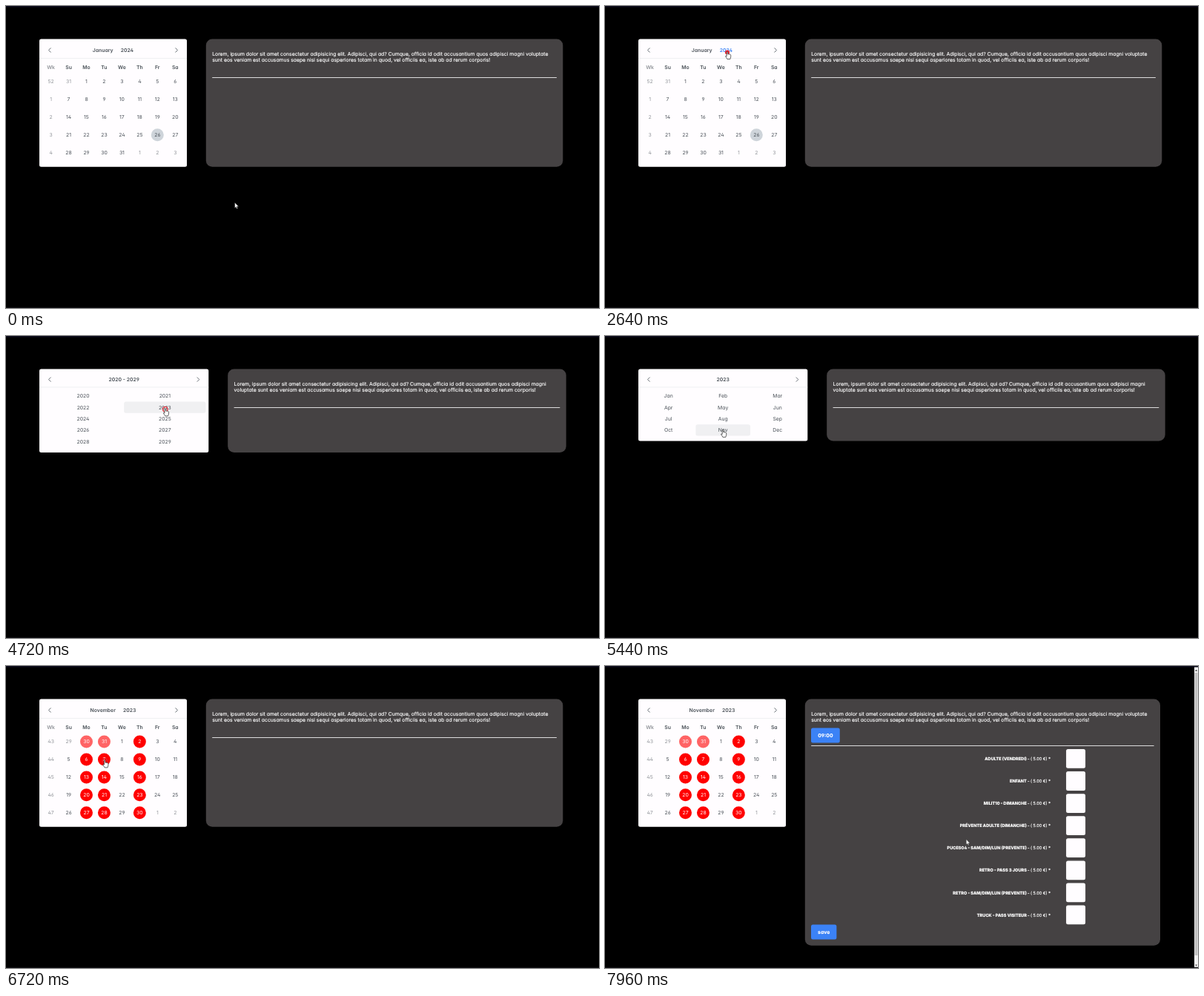
Recreate the animation shown at these times as an HTML page. Size 800 by 407 pixels, loop 8000 ms.

```html
<!DOCTYPE html>
<html lang="en">
<head>
<meta charset="utf-8">
<title>Booking calendar</title>
<style>
html, body { margin: 0; width: 100%; height: 100%; overflow: hidden; background: #000; }
svg { display: block; width: 100%; height: 100%; }
text {
  font: 400 6.84px Inter, "Open Sans", sans-serif;
  font-feature-settings: "cv02", "cv03", "cv04", "cv11";
  text-rendering: geometricPrecision;
  fill: #495057;
  white-space: pre;
}
.mid { text-anchor: middle; }
.end { text-anchor: end; }
.bold { font-weight: 600; }
.dim { opacity: .6; }
.white { fill: #fff; stroke: #fff; stroke-width: .16; }
.label { font-size: 5.6px; }
.label tspan { font-weight: 800; }
.btn { font-weight: 700; }
.card { fill: #fffdff; }
.panel { fill: #454243; }
.blue { fill: #3b82f6; }
.rule { stroke: #e3e6ea; stroke-width: .6; }
.hr { stroke: #dcdcdc; stroke-width: 1; }
.chev { fill: none; stroke: #5c636a; stroke-width: .9; }
.spot { fill: none; }
.today .spot { fill: #ced4da; }
.red .spot { fill: #f00; }
.red text { fill: #fff; }
.hover:not(.red):not(.today) .spot { fill: #f0f0f2; }
.title.hover text { fill: #3b82f6; }
.off { display: none; }
</style>
</head>
<body>
<svg id="stage" viewBox="0 0 800 407" preserveAspectRatio="none"></svg>
<script>
const NS = "http://www.w3.org/2000/svg";
const stage = document.getElementById("stage");

function add(parent, tag, attrs = {}, content) {
  const el = document.createElementNS(NS, tag);
  for (const k in attrs) el.setAttribute(k, attrs[k]);
  if (content !== undefined) el.textContent = content;
  return parent.appendChild(el);
}
const group = (parent, cls = "") => add(parent, "g", { class: cls });
const box = (parent, cls, x, y, width, height, rx = 2.5) =>
  add(parent, "rect", { class: cls, x, y, width, height, rx });
const line = (parent, cls, x1, x2, y) => add(parent, "line", { class: cls, x1, x2, y1: y, y2: y });
// y is the middle of the capitals
const label = (parent, cls, x, y, str, size = 6.84) =>
  add(parent, "text", { class: cls, x, y: y + size * .364 }, str);

// ---- left card ----
const LEFT = 45, TOP = 44.5, DAY = 864e5;

function card(width, height, headY, ruleY) {
  const g = group(stage);
  g.hot = [];
  box(g, "card", LEFT, TOP, width, height);
  line(g, "rule", LEFT, LEFT + width, ruleY);
  for (const [x, d] of [[LEFT + 14, -1], [LEFT + width - 14, 1]])
    add(g, "path", { class: "chev", d: `M${x - d * 1.5} ${headY - 3}l${d * 3} 3l${-d * 3} 3` });
  return g;
}

function hotItem(g, cls, x, y, w, h, str, round) {
  const item = group(g, cls), title = cls.includes("title");
  if (!title) box(item, "spot", x - w / 2, y - h / 2, w, h, round);
  label(item, title ? "mid bold" : "mid", x, y, str);
  g.hot.push({ el: item, x, y, w: w / 2, h: h / 2 });
}

function calendar(month, year, yearX, start, firstWeek, style) {
  const g = card(199, 172.2, 59.5, 70.6);
  const colX = c => 60.6 + 23.95 * c, rowY = r => 102 + 23.95 * r;
  hotItem(g, "title", 130.7, 59.5, 31, 13, month);
  hotItem(g, "title", yearX, 59.5, 21, 13, year);
  "Wk Su Mo Tu We Th Fr Sa".split(" ").forEach((d, c) =>
    label(g, c ? "mid bold" : "mid bold dim", colX(c), 82.3, d));
  const current = new Date(start + 7 * DAY).getUTCMonth();
  for (let r = 0; r < 5; r++) {
    label(g, "mid dim", colX(0), rowY(r), (firstWeek + r - 1) % 52 + 1);
    for (let c = 1; c < 8; c++) {
      const day = new Date(start + (r * 7 + c - 1) * DAY), date = day.getUTCDate();
      const inside = day.getUTCMonth() === current;
      hotItem(g, style(c, date, inside) + (inside ? "" : " dim"), colX(c), rowY(r), 17, 17, date, 8.5);
    }
  }
  return g;
}

function picker(title, height, cols, items) {
  const g = card(228.3, height, 58.6, 69);
  const w = 220.6 / cols, h = 15.4;
  hotItem(g, "title", 159.2, 58.6, title.length * 4.6, 13, title);
  items.forEach((str, i) =>
    hotItem(g, "", 48.9 + w * (i % cols + .5), 80.7 + h * Math.floor(i / cols), w, h, str, 2.5));
  return g;
}

// ---- right panel ----
const lead = "Lorem, ipsum dolor sit amet consectetur adipisicing elit. Adipisci, qui ad? Cumque, officia id odit accusantium quos adipisci magni";
const tail = "sunt eos veniam est accusamus saepe nisi sequi asperiores totam in quod, vel officiis ea, iste ab ad rerum corporis!";

function panel(x, width, height, hrY, wrapEarly) {
  const g = group(stage), word = " voluptate ", pad = 8.4;
  box(g, "panel", x, TOP, width, height, 8.5);
  label(g, "white", x + pad, 64.4, wrapEarly ? lead : lead + word);
  label(g, "white", x + pad, 73, wrapEarly ? word.trimStart() + tail : tail);
  line(g, "hr", x + pad, x + width - pad, hrY);
  return g;
}

function button(g, y, width, str) {
  const x = 278, h = 20;
  box(g, "blue", x, y, width, h);
  label(g, "mid btn white", x + width / 2, y + h / 2, str);
}

function form() {
  const g = panel(269.8, 479.2, 332.3, 107.5, false);
  button(g, 83.6, 38.8, "09:00");
  ["ADULTE (VENDREDI)", "ENFANT", "MILIT10 - DIMANCHE", "PRÉVENTE ADULTE (DIMANCHE)",
   "PUCES04 - SAM/DIM/LUN (PREVENTE)", "RETRO - PASS 3 JOURS",
   "RETRO - SAM/DIM/LUN (PREVENTE)", "TRUCK - PASS VISITEUR"].forEach((name, i) => {
    const y = 125 + 30.08 * i;
    const t = label(g, "end label white", 601, y, "", 5.6);
    add(t, "tspan", {}, name + " - ");
    t.append("( 5.00 €) *");
    box(g, "card", 622.1, y - 13, 26, 25.8);
  });
  button(g, 348.5, 34.4, "save");
  // page scrollbar
  add(g, "rect", { x: 795, width: 5, height: 407, fill: "#f1f1f1" });
  add(g, "rect", { x: 795.6, y: 9, width: 3.9, height: 381, fill: "#c1c1c1" });
  add(g, "path", { d: "M796 7l1.6 -2.2l1.6 2.2zM796 402.4l1.6 2.2l1.6 -2.2z", fill: "#505050" });
  return g;
}

const views = {
  january: calendar("January", "2024", 163.4, Date.UTC(2023, 11, 31), 52,
    (c, d, inside) => inside && d === 26 ? "today" : ""),
  years: picker("2020 - 2029", 112.5, 2, Array.from({ length: 10 }, (_, i) => 2020 + i)),
  months: picker("2023", 97.1, 3, "Jan Feb Mar Apr May Jun Jul Aug Sep Oct Nov Dec".split(" ")),
  november: calendar("November", "2023", 166.6, Date.UTC(2023, 9, 29), 43,
    c => [2, 3, 5].includes(c) ? "red" : "")
};
const panels = {
  tall: panel(269.8, 481.5, 172.2, 96.5, false),
  short: panel(299.2, 456.5, 112.5, 96.5, true),
  low: panel(299.2, 456.5, 97.1, 96.5, true),
  form: form()
};
const scenes = [
  [0, "january", "tall"], [2720, "years", "short"], [4800, "months", "low"],
  [5600, "november", "tall"], [6760, "november", "form"]
];

add(stage, "rect", { width: 800, height: 1.6, fill: "#0c0c1c" });
add(stage, "rect", { y: 405.8, width: 800, height: 1.2, fill: "#101014" });

// ---- pointer ----
const ring = add(stage, "circle", { fill: "#f00", stroke: "#e8202c", "stroke-width": 1.2 });
const pointer = group(stage);
const arrow = add(pointer, "path", {
  d: "M0 0V7.2L1.6 5.7L2.7 8.2L3.8 7.7L2.7 5.3H5z", fill: "#fff", stroke: "#222", "stroke-width": .4
});
const hand = add(pointer, "path", {
  d: "M-.8 .7Q0 -.5 .8 .7V3.6Q4.7 3 4.7 5V7.4L3.8 10.3H-.1Q-.8 8.8 -2.4 6.7Q-2.6 5.4 -.8 6.4z",
  fill: "#fff", stroke: "#222", "stroke-width": .7, "stroke-linejoin": "round"
});

// eased moves: start, end, x, y
const moves = [
  [0, 0, 308.7, 265], [280, 280, 252.5, 236.5], [640, 1560, 163.8, 64.2], [2040, 2160, 165, 61.3],
  [2760, 3400, 115.8, 126.4], [3480, 3680, 100, 138], [3680, 4240, 217, 111], [4240, 4560, 214.8, 97.5],
  [4840, 5440, 159, 126], [5640, 5880, 151.8, 145.6], [5920, 6080, 167, 143], [6080, 6280, 133.2, 126.6],
  [6840, 7360, 300.5, 197.5], [7680, 7960, 487.3, 233.6]
];
const clicks = [2600, 4640, 5480, 6640];

function pointerAt(t) {
  let x = 0, y = 0;
  for (const [from, to, toX, toY] of moves) {
    if (t < from) break;
    const s = to > from ? Math.min(1, (t - from) / (to - from)) : 1;
    const ease = s * s * (3 - 2 * s);
    x += (toX - x) * ease;
    y += (toY - y) * ease;
  }
  return [x, y];
}

function draw(now) {
  const t = Math.floor(now % 8000 / 40) * 40;
  const [, view, side] = scenes.filter(s => s[0] <= t).pop();
  for (const k in views) views[k].classList.toggle("off", k !== view);
  for (const k in panels) panels[k].classList.toggle("off", k !== side);

  const [x, y] = pointerAt(t);
  let over = false;
  for (const h of views[view].hot) {
    const hit = Math.abs(x - h.x) < h.w && Math.abs(y - h.y) < h.h;
    h.el.classList.toggle("hover", hit);
    over = over || hit;
  }
  pointer.setAttribute("transform", `translate(${x} ${y})`);
  arrow.classList.toggle("off", over);
  hand.classList.toggle("off", !over);

  const age = t - Math.max(-1e4, ...clicks.filter(c => c <= t));
  ring.classList.toggle("off", age > 120);
  ring.setAttribute("cx", x);
  ring.setAttribute("cy", y + 1.2);
  ring.setAttribute("r", 1.6 + age / 50);
  ring.setAttribute("fill-opacity", age < 60 ? .8 : 0);
  requestAnimationFrame(draw);
}
draw(0);
</script>
</body>
</html>
```
